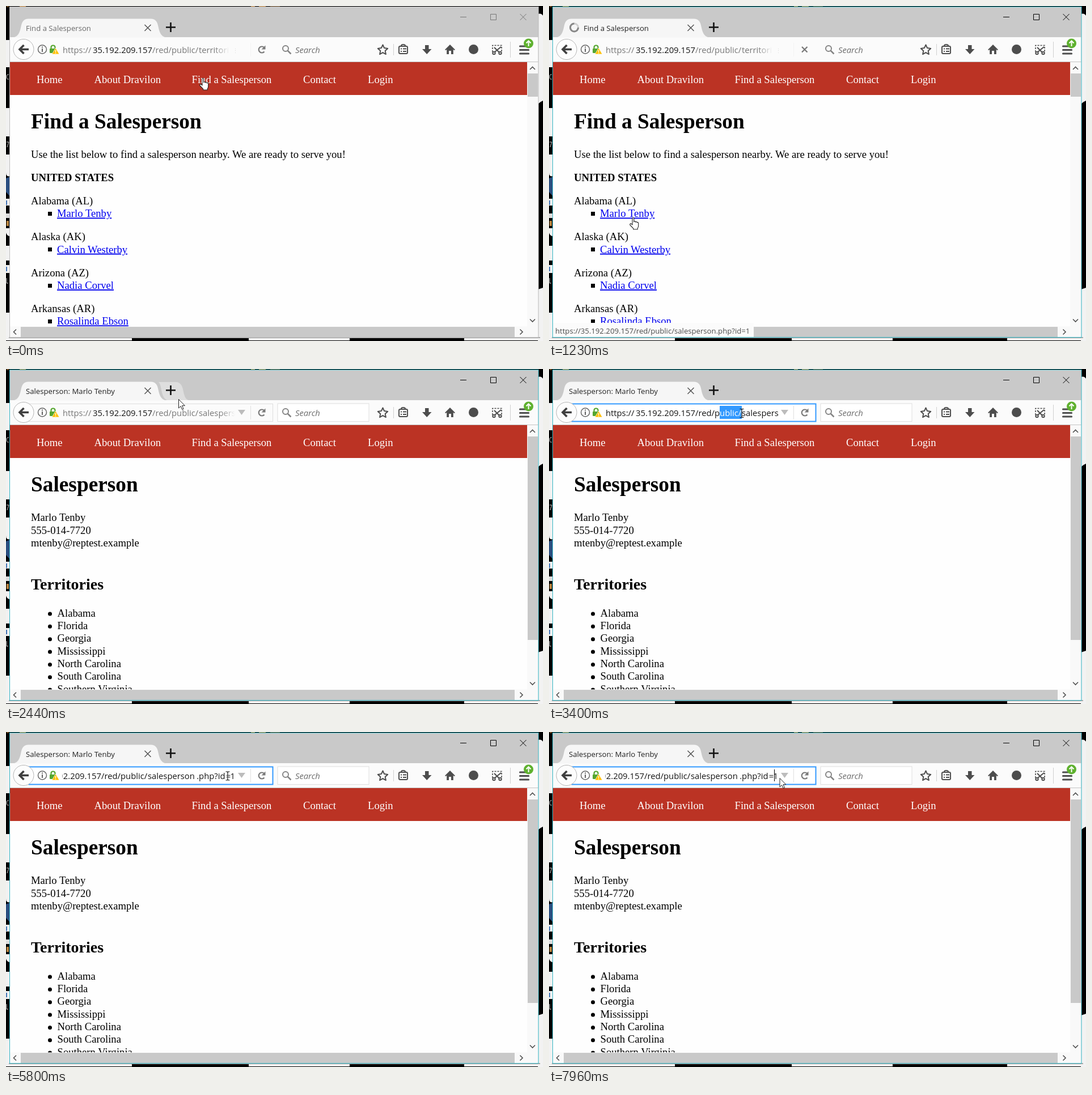
Recreate the animation shown at these times as an HTML page. Size 947 by 591 pixels, loop 8000 ms.

```html
<!DOCTYPE html>
<html lang="en">
<head>
<meta charset="utf-8">
<title>Find a Salesperson</title>
<style>
html, body { margin: 0; width: 100%; height: 100%; overflow: hidden; background: #000; }
svg { display: block; width: 100%; height: 100%; }
text { white-space: pre; }
.page { font: 18.67px "Liberation Serif", "Times New Roman", serif; }
.h1 { font-size: 37.33px; font-weight: bold; }
.h2 { font-size: 28px; font-weight: bold; }
.b { font-weight: bold; }
.link { fill: #00e; text-decoration: underline; }
.ui { font: 13.15px "Open Sans", "Noto Sans", sans-serif; }
.url { font: 14.8px "Open Sans", "Noto Sans", sans-serif; }
.line { fill: none; stroke: #4d4d4d; stroke-width: 2; }
.thumb { fill: #c9c9c9; }
.chev { fill: none; stroke: #505050; stroke-width: 1.6; }
[hidden] { display: none; }
</style>
</head>
<body>
<svg viewBox="0 0 947 591">
  <defs>
    <clipPath id="view"><rect x="7" y="99" width="912" height="466.5"/></clipPath>
    <clipPath id="field"><rect x="99.5" y="62" width="305" height="30"/></clipPath>
    <clipPath id="selClip"><rect id="selHole" y="65" height="23"/></clipPath>
    <linearGradient id="fadeFill">
      <stop offset="0" stop-color="#fbfbfb" stop-opacity="0"/>
      <stop offset="1" stop-color="#fbfbfb"/>
    </linearGradient>
    <g id="address">
      <text x="100" y="82.5">https://</text>
      <text x="153" y="82.5">35.192.209.157</text>
      <text x="258" y="82.5">/red/public/</text>
      <text x="340" y="82.5">salesperson</text>
      <text x="476.5" y="82.5" text-anchor="end">.php?id</text>
      <text x="482" y="82.5" text-anchor="middle">=</text>
      <text x="494" y="82.5" text-anchor="end">1</text>
    </g>
  </defs>

  <!-- desktop showing around the window -->
  <rect width="947" height="591"/>
  <g fill="#f2f2f2">
    <path d="M0 60h7v48H0zM0 180h7v50H0zM0 262h7v38q-7 2-7-6zM0 340h7v12H0zM0 392h7v14q-5 0-7-6zM0 423h7v26H0zM0 457h7v14H0zM0 541h7v44H0z"/>
    <path d="M938 14q6-2 9 3v150l-4 2-5 4zM938 500l9-3v94h-9z"/>
    <path d="M0 584h222v6H0zM428 584h178v6H428zM808 584h139v6H808z"/>
  </g>
  <path fill="#2b4f80" d="M0 304l7-3v35l-7-8z"/>
  <path stroke="#4a7ab8" stroke-width="2" d="M1 343v8M1 460v8"/>
  <path stroke="#c98a3c" d="M1 1h4M24 .5h11M432 .5h7M446 .5h12M466 1h17"/>
  <path fill="none" stroke="#ccc" d="M5 121q-4-1-4 4t4 4M1 240h4l-3 9M1 480v9h3"/>
  <rect x="0" y="366" width="6" height="8" fill="#ddd"/>
  <rect x="1" y="379" width="4" height="9" fill="#b9853f"/>
  <rect x="5" y="584" width="937" height="2" fill="#aaa"/>

  <!-- window frame -->
  <rect x="6" y="2" width="933" height="583" fill="#c9c9c9"/>
  <path id="newTab" fill="#dedede" d="M269 23h30c10 0 12 8 14 17 2 10 4 13 9 15h-38c-7-4-8-10-10-18-1-6-2-11-5-14z"/>
  <rect x="7" y="55" width="931.500" height="44" fill="#fbfbfb"/>
  <path fill="#f6f6f6" d="M13 55.500c9-2 11-9 13-17 2-11 5-16 14-16h215c9 0 12 5 14 16 2 8 4 15 13 17z"/>
  <path stroke="#111" stroke-width="2.600" d="M282 37.500h17M290.500 29v17"/>
  <path stroke="#555" stroke-width="1.500" d="M244.500 33l11 11M255.500 33l-11 11"/>
  <path id="controls" fill="none" d="M801 19.500h11M854.500 14.500h10v10h-10zM906.500 14l11 11M917.500 14l-11 11"/>
  <g id="spinner" fill="none" stroke-width="3">
    <circle cx="44.500" cy="38" r="7" stroke="#d0d0d0"/>
    <path stroke="#888" d="M44.500 31a7 7 0 1 0 7 7"/>
  </g>
  <text id="title" class="ui" y="43.500"></text>

  <!-- address field -->
  <rect id="urlBox" x="40.500" y="61.500" width="430" height="31"/>
  <rect id="searchBox" x="479" y="61" width="161" height="31.500" fill="#fff" stroke="#dedede"/>
  <g class="url">
    <g id="idle" fill="#777" clip-path="url(#field)">
      <text x="100" y="82.500">https://</text>
      <text x="153" y="82.500" fill="#151515">35.192.209.157</text>
      <text x="258" y="82.500">/red/public/</text>
      <text id="idleFile" x="340" y="82.500"></text>
      <rect id="fade" y="64" width="26" height="26" fill="url(#fadeFill)"/>
      <rect id="fadeEnd" y="64" width="40" height="26" fill="#fbfbfb"/>
    </g>
    <g id="edit">
      <g clip-path="url(#field)"><use id="plain" href="#address" fill="#151515"/></g>
      <g clip-path="url(#field)"><g clip-path="url(#selClip)">
        <rect x="99" y="65" width="306" height="23" fill="#3399ff"/>
        <use id="picked" href="#address" fill="#fff"/>
      </g></g>
      <path id="caret" stroke="#000" d="M397.500 66v21"/>
    </g>
    <text x="510" y="82.500" fill="#6d6d6d" font-style="italic">Search</text>
  </g>
  <path id="drop" fill="#bcbcbc" d="M409 72h13l-6.500 9z"/>
  <path id="dropLine" stroke="#e0e0e0" d="M431.500 65v24"/>
  <circle cx="31" cy="76.500" r="18" fill="#fdfdfd" stroke="#b5b5b5"/>
  <path fill="none" stroke="#3f3f3f" stroke-width="3.600" d="M40 76.500H25M31.500 69l-7.500 7.500 7.500 7.500"/>
  <circle cx="64" cy="76.500" r="7.500" fill="none" stroke="#666" stroke-width="1.500"/>
  <path stroke="#555" stroke-width="1.800" d="M64 75v6M64 71.500v2"/>
  <path fill="none" stroke="#55a630" stroke-width="2.200" d="M79.500 77v-4q0-3.500 3.500-3.500t3.500 3.500v3"/>
  <rect x="77" y="75" width="11" height="8" rx="1" fill="#55a630"/>
  <path fill="#ffbf00" stroke="#fff" stroke-width=".7" d="M87.500 74l6.500 11H81z"/>
  <path stroke="#fff" stroke-width="1.500" d="M87.500 78v3M87.500 82v1.500"/>
  <g id="reload">
    <path fill="none" stroke="#7a7a7a" stroke-width="2.200" d="M455.500 80.500a5.500 5.500 0 1 1-.5-7.500"/>
    <path fill="#7a7a7a" d="M457.500 69.500v7h-7z"/>
  </g>
  <path id="stop" stroke="#777" stroke-width="2.200" d="M446 72l9.500 9.500M455.500 72l-9.500 9.500"/>
  <circle cx="493" cy="75" r="5" fill="none" stroke="#858585" stroke-width="2"/>
  <path stroke="#858585" stroke-width="2.500" d="M496.500 78.500l6 6"/>

  <!-- toolbar icons -->
  <path class="line" stroke-linejoin="round" d="M664.500 68.500l2.600 5.600 6.100.8-4.500 4.200 1.200 6-5.400-3-5.400 3 1.200-6-4.500-4.200 6.100-.8z"/>
  <path stroke="#d0d0d0" d="M683.500 67v20M889.500 63v28"/>
  <rect class="line" x="693" y="71" width="15" height="13" rx="2"/>
  <path class="line" d="M697 70q0-2 3.500-2t3.500 2M696 75.500h2M700 75.500h6M696 80h2M700 80h6"/>
  <path fill="#4d4d4d" d="M739 69h6.500v7h5L742.200 85 734 76h5z"/>
  <path fill="#4d4d4d" d="M783 68l9 9-1.500 1.200-1.700-1.700V85H785v-6h-4v6h-3.800v-8.500l-1.700 1.700L774 77z"/>
  <circle cx="824.500" cy="76.500" r="8.500" fill="#4d4d4d"/>
  <path fill="none" stroke="#4d4d4d" stroke-width="1.600" stroke-dasharray="3 2" d="M858 81V69.500h16V81"/>
  <path class="line" d="M873 72l-11 9M861 73l9 9"/>
  <circle class="line" cx="860.500" cy="83" r="2.200"/><circle class="line" cx="871.500" cy="83" r="2.200"/>
  <path stroke="#4d4d4d" stroke-width="3.200" stroke-linecap="round" d="M906.500 71h15M906.500 77.500h15M906.500 84h15"/>
  <circle cx="921.500" cy="66" r="8.500" fill="#5fb12f"/>
  <path fill="none" stroke="#fff" stroke-width="2" d="M921.500 71v-9.500M917.500 65.500l4-4 4 4"/>
  <path stroke="#c4c4c4" d="M7 98.500h931.500"/>

  <!-- web page -->
  <rect x="7" y="99" width="931.500" height="485" fill="#fefefe"/>
  <g class="page" clip-path="url(#view)">
    <rect x="7" y="99" width="912" height="58" fill="#bb3324"/>
    <g id="nav" fill="#fff"></g>
    <g id="listPage">
      <text class="h1" x="44" y="216">Find a Salesperson</text>
      <text x="44" y="268">Use the list below to find a salesperson nearby. We are ready to serve you!</text>
      <text class="b" x="44" y="309">UNITED STATES</text>
    </g>
    <g id="personPage">
      <text class="h1" x="44" y="216">Salesperson</text>
      <text x="44" y="268">Marlo Tenby</text>
      <text x="44" y="290.500">555-014-7720</text>
      <text x="44" y="313">mtenby@reptest.example</text>
      <text class="h2" x="44" y="389">Territories</text>
    </g>
  </g>
  <rect x="919" y="99" width="19.500" height="485" fill="#f9f9f9"/>
  <rect x="7" y="565.500" width="912" height="18.500" fill="#f9f9f9"/>
  <rect id="vThumb" class="thumb" x="920" y="119" width="18"/>
  <rect class="thumb" x="26" y="566" width="871" height="18"/>
  <path class="chev" d="M924 112l4.500-4.500 4.500 4.500M924 552.500l4.500 4.500 4.500-4.500M18 570.500l-4.500 4.500 4.500 4.500M906.500 570.500l4.500 4.500-4.500 4.500"/>
  <g id="status">
    <rect id="statusBox" x="7" y="559" height="25" fill="#fbfbfb"/>
    <text id="statusText" class="ui" x="11" y="578" fill="#4a4a4a"></text>
  </g>
  <rect id="frame" x="6.500" y="1.500" width="932.500" height="583" fill="none"/>

  <!-- pointers -->
  <g id="arrow"><path fill="#fff" stroke="#222" d="M.5.500v15.500l3.600-3.400 2.500 5.700 2.400-1-2.500-5.600h4.900z"/></g>
  <g id="hand"><path fill="#fff" stroke="#222" stroke-width="1.100" stroke-linejoin="round" d="M5 13V2q0-1.500 1.400-1.500T7.800 2v6q.2-1.300 1.500-1.200t1.400 1.700q.2-1.200 1.400-1t1.300 1.700q.3-1 1.300-.7t1 1.600v4.600q0 2.500-1.500 4.300v2H6.700v-1.700L1 13.500q-.8-1.500.3-2.300t2.200.4z"/></g>
  <g id="beam" fill="none">
    <path stroke="#fff" stroke-opacity=".6" stroke-width="2.500" d="M0-7V7"/>
    <path stroke="#111" stroke-width="1.200" d="M-3.500-7.500h2.500l1 1 1-1h2.500M0-6.500v13M-3.500 7.500h2.500l1-1 1 1h2.500"/>
  </g>
</svg>
<script>
const $ = id => document.getElementById(id);
const LOOP = 8000, LOAD = 1230, OPEN = 1360, FOCUS = 2840, SCROLL = 3820;
const ROOT = "https://35.192.209.157/red/public/";

function add(parent, tag, attrs, label) {
  const el = document.createElementNS("http://www.w3.org/2000/svg", tag);
  for (const key in attrs) el.setAttribute(key, attrs[key]);
  if (label) el.textContent = label;
  $(parent).append(el);
}
function set(id, attrs) {
  for (const key in attrs) $(id).setAttribute(key, attrs[key]);
}
const show = (id, on) => $(id).toggleAttribute("hidden", !on);

[["Home", 54], ["About Dravilon", 155.5], ["Find a Salesperson", 327.5], ["Contact", 524], ["Login", 638]]
  .forEach(([label, x]) => add("nav", "text", { x, y: 136 }, label));

[["Alabama (AL)", "Marlo Tenby"], ["Alaska (AK)", "Calvin Westerby"],
 ["Arizona (AZ)", "Nadia Corvel"], ["Arkansas (AR)", "Rosalinda Ebson"]]
  .forEach(([state, person], i) => {
    const y = 350 + i * 63.3;
    add("listPage", "text", { x: 44, y }, state);
    add("listPage", "rect", { x: 74, y: Math.round(y + 13), width: 7, height: 7 });
    add("listPage", "text", { x: 90, y: y + 22.4, class: "link" }, person);
  });

["Alabama", "Florida", "Georgia", "Mississippi", "North Carolina", "South Carolina", "Southern Virginia"]
  .forEach((state, i) => {
    const y = 436.7 + i * 22.35;
    add("personPage", "circle", { cx: 77.5, cy: y - 4.7, r: 3.5 });
    add("personPage", "text", { x: 90.5, y }, state);
  });

// start time, pointer, x, y
const moves = [
  [0, "hand", 341, 127], [130, "arrow", 265, 264], [280, "arrow", 200, 350], [410, "arrow", 163, 392],
  [560, "arrow", 160, 399], [690, "arrow", 157, 398], [820, "arrow", 153, 392], [950, "hand", 144, 377],
  [1070, "hand", 142, 373], [1360, "arrow", 141, 364], [1630, "arrow", 138, 340], [1760, "arrow", 128, 265],
  [1880, "arrow", 113, 170], [2010, "arrow", 102, 107], [2160, "beam", 180, 82], [2310, "arrow", 275, 62],
  [2440, "arrow", 304, 53], [2700, "beam", 302, 67], [2840, "beam", 301, 76], [3400, "beam", 340, 78],
  [3530, "beam", 381, 80], [3680, "beam", 398, 82], [3820, "beam", 420, 83], [3940, "beam", 428.5, 84],
  [4090, "beam", 431, 84], [4490, "arrow", 424, 82], [4620, "arrow", 410, 79], [4750, "beam", 398, 78],
  [5410, "beam", 396, 77], [5540, "beam", 394, 77], [5800, "beam", 391, 77.5], [5950, "beam", 384, 77],
  [6080, "beam", 374, 77], [6210, "beam", 363, 77], [6350, "beam", 373, 77], [6480, "beam", 390, 77],
  [6600, "beam", 404, 78], [6750, "beam", 406, 79.5], [6900, "beam", 405, 79], [7020, "beam", 404, 79],
  [7420, "beam", 390, 77], [7550, "beam", 404, 79], [7700, "beam", 408, 83], [7960, "arrow", 406.5, 81]
];
// start time, left and right edge of the selection
const picks = [
  [0, 0, 0], [2840, 100, 404], [3270, 301, 301], [3400, 301, 340], [3530, 301, 381], [3680, 301, 398],
  [3820, 210.5, 404], [5150, 0, 0], [5950, 379, 387], [6080, 371, 387], [6210, 363, 387],
  [6350, 371, 387], [6480, 0, 0]
];
const carets = [[0, 0], [5150, 1], [5540, 0], [7420, 1], [7550, 0], [7960, 1]];
const at = (list, t) => list.findLast(step => step[0] <= t);

function draw(t) {
  const active = t >= LOAD, loading = active && t < OPEN, opened = t >= OPEN, focused = t >= FOCUS;
  const hover = t >= 2160;

  show("listPage", !opened);
  show("personPage", opened);
  set("vThumb", { height: opened ? 359 : 41 });
  set("frame", { stroke: active ? "#35b6c4" : "#bdbdbd" });
  set("controls", { stroke: active ? "#000" : "#777" });

  show("spinner", loading);
  show("stop", loading);
  show("reload", !loading);
  $("title").textContent = opened ? "Salesperson: Marlo Tenby" : "Find a Salesperson";
  set("title", { x: loading ? 61 : 35, fill: active ? "#222" : "#6a6a6a" });
  show("newTab", t >= 2440 && t < 2700);

  show("searchBox", opened);
  show("urlBox", opened);
  set("urlBox", {
    fill: focused ? "#fff" : "#fbfbfb",
    stroke: focused ? "#3399ff" : "#dedede",
    "stroke-width": focused ? 2 : 1
  });
  show("drop", hover);
  show("dropLine", true);
  set("dropLine", { stroke: opened ? "#e0e0e0" : "#f3f3f3" });
  show("idle", !focused);
  $("idleFile").textContent = opened ? "salesperson.php" : "territories.php";
  const end = opened ? 404 : 394;
  set("fade", { x: end - 26 });
  set("fadeEnd", { x: end });

  show("edit", focused);
  const shift = `translate(${t >= SCROLL ? -90 : 0} 0)`;
  set("plain", { transform: shift });
  set("picked", { transform: shift });
  const [, left, right] = at(picks, t);
  set("selHole", { x: left, width: right - left });
  show("caret", at(carets, t)[1]);

  const leaving = t >= 130 && t < 280;
  show("status", leaving || (t >= 1070 && !opened));
  $("statusText").textContent = ROOT + (leaving ? "territories.php" : "salesperson.php?id=1");
  set("statusBox", { width: leaving ? 309 : 354 });

  const [, kind, x, y] = at(moves, t);
  for (const id of ["arrow", "hand", "beam"]) show(id, id === kind);
  set(kind, { transform: `translate(${x} ${y})` });
}

function tick() {
  draw(performance.now() % LOOP);
  requestAnimationFrame(tick);
}
tick();
</script>
</body>
</html>
```
